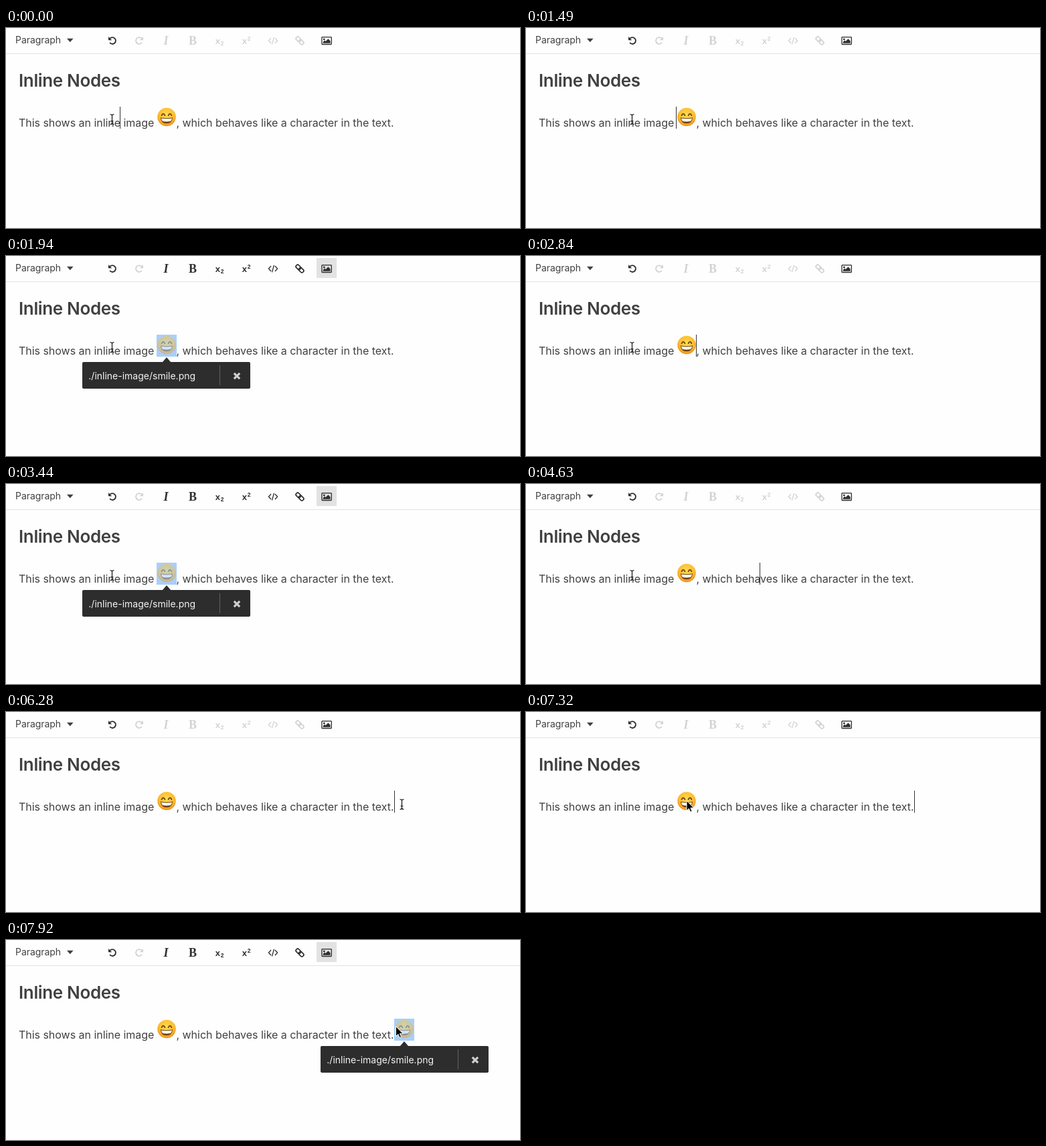
Write an HTML page that moves like this. It is 768 px wide and 300 px high and loops after 8000 ms.

```html
<!DOCTYPE html>
<html lang="en">
<head>
<meta charset="utf-8">
<title>Inline Nodes</title>
<style>
  html, body { margin: 0; width: 100%; height: 100%; overflow: hidden; background: #fefefe; }
  svg { display: block; width: 100%; height: 100%; }
  text {
    font-family: Inter, "Open Sans", sans-serif;
    font-optical-sizing: none;
    fill: #404040;
  }
  .menu { font-size: 14px; letter-spacing: -.05px; }
  .title { font-size: 26px; font-weight: 600; letter-spacing: -.35px; }
  .body { font-size: 16px; letter-spacing: -.03px; }
  .path { font-size: 14px; fill: #f4f4f4; }

  .tools { color: #2e2e2e; }
  .tools .off, .tools .format { color: #d3d3d3; }
  .selected .tools .format { color: #2e2e2e; }
  .tools text { fill: currentColor; font-weight: 700; }
  .tools .serif { font-family: "Liberation Serif", "Noto Serif", serif; font-size: 18px; text-anchor: middle; }
  .tools .sans { font-family: "Liberation Sans", sans-serif; font-size: 13px; }
  .tools .mini { font-size: 8.5px; }
  .line { fill: none; stroke: currentColor; }

  .pressed, .pick { visibility: hidden; }
  .selected .pressed, .selected .pick { visibility: visible; }
</style>
</head>
<body>
<svg id="stage" viewBox="0 0 768 300">
  <defs>
    <radialGradient id="skin" cx=".5" cy=".38" r=".64">
      <stop offset="0" stop-color="#ffdb4c"/>
      <stop offset=".6" stop-color="#fdbf34"/>
      <stop offset="1" stop-color="#ea8d1b"/>
    </radialGradient>
    <g id="smile">
      <circle r="13.7" fill="url(#skin)"/>
      <path d="M-7.4 -2.4Q-5 -7.4 -2.6 -2.4M2.6 -2.4Q5 -7.4 7.4 -2.4"
            fill="none" stroke="#6b420f" stroke-width="1.8" stroke-linecap="round"/>
      <path d="M-9.2 .8Q0 2.6 9.2 .8Q8.4 9.8 0 9.8Q-8.4 9.8 -9.2 .8Z" fill="#70430f"/>
      <path d="M-8 2Q0 3.6 8 2Q7.6 5 6 6.2Q0 7.6 -6 6.2Q-7.6 5 -8 2Z" fill="#fff"/>
    </g>
    <g id="undo">
      <path class="line" d="M-3.6 -3.3A4.9 4.9 0 1 1 -3.9 3" stroke-width="1.9"/>
      <path d="M-6 -6V-.8H-.8Z" fill="currentColor"/>
    </g>
    <path id="beam" d="M-3 -7.5Q0 -7.5 0 -5.5V5.5Q0 7.5 -3 7.5M3 -7.5Q0 -7.5 0 -5.5M0 5.5Q0 7.5 3 7.5M-2 2.5H2" fill="none"/>
  </defs>

  <rect width="768" height="300" fill="#fefefe"/>
  <path d="M0 38.5H768" stroke="#e2e2e2"/>

  <text class="menu" x="14" y="23">Paragraph</text>
  <path d="M91 15.8H100.6L95.8 21.2Z" fill="#404040"/>

  <g class="tools">
    <rect class="pressed" x="464" y="3" width="30" height="30" fill="#e2e2e2"/>
    <use href="#undo" x="159" y="19"/>
    <g class="off" transform="translate(199 19) scale(-1 1)"><use href="#undo"/></g>
    <g class="format">
      <text class="serif" x="239" y="25" font-style="italic">I</text>
      <text class="serif" x="279" y="25">B</text>
      <text class="sans" x="312.8" y="23.5">x</text>
      <text class="sans mini" x="320.8" y="26">2</text>
      <text class="sans" x="352.8" y="24">x</text>
      <text class="sans mini" x="360.8" y="19">2</text>
      <path class="line" d="M396 15L392.4 19L396 23M402 15L405.6 19L402 23M400.5 13.8L397.5 24.4" stroke-width="1.3"/>
      <g class="line" transform="translate(439 19) rotate(45)" stroke-width="1.7">
        <rect x="-7" y="-2.6" width="7.8" height="5.2" rx="2.2"/>
        <rect x="-.8" y="-2.6" width="7.8" height="5.2" rx="2.2"/>
      </g>
    </g>
    <rect class="line" x="471.9" y="13.6" width="14.4" height="10.9" rx=".8" stroke-width="1.3"/>
    <circle cx="475.3" cy="16.9" r="1.4" fill="currentColor"/>
    <path d="M473.7 22.8V21L476.2 18.5L477.6 19.9L481.4 16.2L484.6 19.4V22.8Z" fill="currentColor"/>
  </g>

  <text class="title" x="19" y="88">Inline Nodes</text>
  <text class="body" x="19" y="148">This shows an inline image</text>
  <text class="body" x="254.5" y="148">, which behaves like a character in the text.</text>
  <use id="inline" href="#smile" x="240" y="133.5"/>

  <g id="pick" class="pick">
    <rect x="225" y="118" width="30" height="33" fill="#a9cffa"/>
    <use href="#smile" x="240" y="133.5" opacity=".45"/>
    <path d="M233.5 159.5L240 152L246.5 159.5Z" fill="#2d2d2d"/>
  </g>
  <g id="tip" class="pick">
    <rect x="114" y="159" width="251" height="40" rx="2" fill="#2d2d2d"/>
    <text class="path" x="123.3" y="185">./inline-image/smile.png</text>
    <path d="M319.5 164V194" stroke="#626262"/>
    <path d="M340.8 175.8L349.2 184.2M349.2 175.8L340.8 184.2" stroke="#cfcfcf" stroke-width="3.2"/>
  </g>

  <rect id="caret" y="118" width="1" height="33" fill="#333"/>
  <use id="ghost" href="#smile" opacity=".5"/>
  <g id="ibeam">
    <use href="#beam" stroke="#fff" stroke-width="2.2" opacity=".6"/>
    <use href="#beam" stroke="#111" stroke-width="1.2"/>
  </g>
  <path id="arrow" d="M0 0V15L3.4 11.8L5.7 17L8.1 16L5.9 10.9H10.6Z" fill="#000" stroke="#fff" stroke-width="1"/>
</svg>
<script>
  const LOOP = 8000, HIDDEN = -50;

  // Each track holds [start ms, value...]; values change without easing.
  const caretTrack = [
    [0, 170], [300, 174], [440, 178], [740, 192], [890, 201], [1190, 210], [1340, 219], [1490, 224],
    [1940, HIDDEN], [2840, 254], [3290, HIDDEN], [3890, 254], [4030, 259],
    [4330, 277], [4480, 309], [4630, 349], [4780, 384], [4930, 410], [5080, 441], [5230, 480], [5380, 503],
    [6280, 580], [7770, HIDDEN]
  ];
  const pickTrack = [[0, ''], [1940, 'inline'], [2840, ''], [3290, 'inline'], [3890, ''], [7770, 'end']];
  const mouseTrack = [
    [0, 'ibeam', 158.5, 137], [5680, 'ibeam', 215, 143], [5830, 'ibeam', 360, 153],
    [5980, 'ibeam', 505, 150], [6130, 'ibeam', 578, 142], [6280, 'ibeam', 591.5, 138.5],
    [6730, 'ibeam', 530, 139], [6880, 'ibeam', 390, 137], [7030, 'arrow', 262, 133],
    [7180, 'arrow', 240, 133], [7330, 'drag', 300, 131], [7480, 'drag', 440, 126],
    [7630, 'drag', 572, 128], [7770, 'arrow', 562, 101], [7920, 'arrow', 582.5, 129.5]
  ];

  const el = id => document.getElementById(id);
  const [stage, caret, pick, tip, inline, ghost, ibeam, arrow] =
    ['stage', 'caret', 'pick', 'tip', 'inline', 'ghost', 'ibeam', 'arrow'].map(el);

  const at = (track, t) => track.findLast(step => step[0] <= t).slice(1);
  const move = (node, x, y) => node.setAttribute('transform', `translate(${x} ${y})`);
  const show = (node, on) => node.setAttribute('display', on ? 'inline' : 'none');

  function draw(t) {
    caret.setAttribute('x', at(caretTrack, t)[0]);

    const [place] = at(pickTrack, t);
    stage.classList.toggle('selected', place !== '');
    show(inline, place !== 'inline');
    move(pick, place === 'end' ? 355 : 0, 0);
    move(tip, place === 'end' ? 356 : 0, 0);

    const [kind, x, y] = at(mouseTrack, t);
    show(ibeam, kind === 'ibeam');
    show(arrow, kind !== 'ibeam');
    show(ghost, kind === 'drag');
    move(ibeam, x, y);
    move(arrow, x, y);
    move(ghost, x, y);
  }

  function tick() {
    draw(performance.now() % LOOP);
    requestAnimationFrame(tick);
  }
  tick();
</script>
</body>
</html>
```
